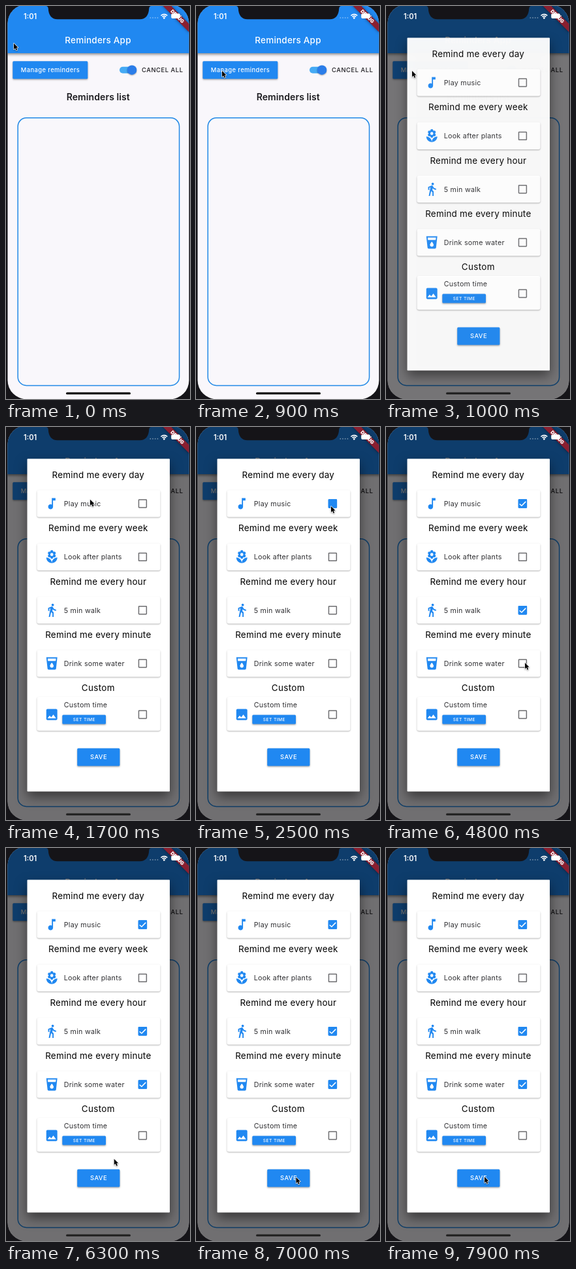
Write an HTML page with a canvas that moves like this. It is 282 by 600 pixels and loops after 8000 ms.

```html
<!DOCTYPE html>
<html lang="en">
<head>
<meta charset="utf-8">
<title>Reminders</title>
<style>
html, body { margin: 0; width: 100%; height: 100%; overflow: hidden; background: #151418; }
canvas { display: block; width: 282px; height: 600px; }
</style>
</head>
<body>
<canvas id="stage"></canvas>
<script>
const W = 282, H = 600, LOOP = 8000, STEP = 100;
const BLUE = '#2088f1', BEZEL = '#151418', INK = '#1d1c20';
const canvas = document.getElementById('stage');
const ctx = canvas.getContext('2d');
const dpr = window.devicePixelRatio || 1;
canvas.width = W * dpr;
canvas.height = H * dpr;

const clamp = v => Math.max(0, Math.min(1, v));
const smooth = v => v * v * (3 - 2 * v);

const icons = {
  note: 'M12 3v10.55c-.59-.34-1.27-.55-2-.55-2.21 0-4 1.79-4 4s1.79 4 4 4 4-1.79 4-4V7h4V3h-6z',
  leaves: 'M12 22c4.97 0 9-4.03 9-9-4.97 0-9 4.03-9 9zM3 13c0 4.97 4.03 9 9 9 0-4.97-4.03-9-9-9z',
  walk: 'M13.5 5.5c1.1 0 2-.9 2-2s-.9-2-2-2-2 .9-2 2 .9 2 2 2zM9.8 8.9L7 23h2.1l1.8-8 2.1 2v6h2v-7.5l-2.1-2 .6-3C14.8 12 16.8 13 19 13v-2c-1.9 0-3.5-1-4.3-2.4l-1-1.6c-.4-.6-1-1-1.7-1-.3 0-.5.1-.8.1L6 8.3V13h2V9.6l1.8-.7z',
  drink: 'M3 2l2.01 18.23C5.13 21.23 5.97 22 7 22h10c1.03 0 1.87-.77 1.99-1.77L21 2H3zm9 17c-1.66 0-3-1.34-3-3 0-2 3-5.4 3-5.4s3 3.4 3 5.4c0 1.66-1.34 3-3 3zm6.33-11H5.67l-.44-4h13.55l-.45 4z',
  image: 'M21 19V5c0-1.1-.9-2-2-2H5c-1.1 0-2 .9-2 2v14c0 1.1.9 2 2 2h14c1.1 0 2-.9 2-2zM8.5 13.5l2.5 3.01L14.5 12l4.5 6H5l3.5-4.5z'
};
for (const k in icons) icons[k] = new Path2D(icons[k]);

// y is the middle of the card, on is the time its box gets ticked
const rows = [
  { head: 'Remind me every day', label: 'Play music', icon: 'note', y: 117, on: 2400 },
  { head: 'Remind me every week', label: 'Look after plants', icon: 'leaves', y: 198.4 },
  { head: 'Remind me every hour', label: '5 min walk', icon: 'walk', y: 279.7, on: 4100 },
  { head: 'Remind me every minute', label: 'Drink some water', icon: 'drink', y: 361, on: 5100 }
];

// time, x, y of the pointer tip where it rests
const track = [
  [0, 12, 57], [700, 40, 99], [1100, 40, 99],
  [2250, 207, 121], [2800, 207, 121],
  [3900, 211, 279], [4250, 211, 279],
  [4750, 213, 360], [5400, 213, 360],
  [6660, 154, 503], [7900, 151, 502], [8000, 151, 502]
];

function pointerAt(t) {
  let i = 0;
  while (i < track.length - 2 && track[i + 1][0] <= t) i++;
  const [t0, x0, y0] = track[i], [t1, x1, y1] = track[i + 1];
  const k = smooth(clamp((t - t0) / (t1 - t0)));
  return [x0 + (x1 - x0) * k, y0 + (y1 - y0) * k];
}

function text(s, x, y, size, weight, color, spacing = 0, align = 'left') {
  ctx.font = `${weight} ${size}px Inter, Roboto, sans-serif`;
  ctx.letterSpacing = spacing + 'px';
  ctx.textAlign = align;
  ctx.fillStyle = color;
  ctx.fillText(s, x, y);
}

function box(x, y, w, h, r, fill) {
  ctx.beginPath();
  ctx.roundRect(x, y, w, h, r);
  ctx.fillStyle = fill;
  ctx.fill();
}

function disc(x, y, r) {
  ctx.beginPath();
  ctx.arc(x, y, r, 0, 7);
  ctx.fill();
}

function raised(blur, dy, alpha, draw) {
  ctx.save();
  ctx.shadowColor = `rgba(0,0,0,${alpha})`;
  ctx.shadowBlur = blur * dpr;
  ctx.shadowOffsetY = dy * dpr;
  draw();
  ctx.restore();
}

function button(x, y, w, h, label, size, spacing) {
  raised(2.5, 1.3, .36, () => box(x, y, w, h, 1.5, BLUE));
  text(label, x + w / 2 + spacing / 2, y + h / 2 + size * .36, size, 500, '#fff', spacing, 'center');
}

function icon(name, x, y) {
  ctx.save();
  ctx.translate(x, y);
  ctx.scale(.94, .94);
  ctx.translate(-12, -12);
  ctx.fillStyle = BLUE;
  ctx.fill(icons[name], 'evenodd');
  if (name === 'leaves') {
    for (const [px, py] of [[12, 3.5], [8.1, 5.75], [15.9, 5.75], [8.1, 10.25], [15.9, 10.25], [12, 12.5]]) disc(px, py, 2.5);
    disc(12, 8, 4);
    ctx.fillStyle = '#fff';
    disc(12, 8, 2.5);
  }
  ctx.restore();
}

function checkbox(y, k) {
  const s = 13.4, x = 209.4 - s / 2, top = y - s / 2;
  ctx.strokeStyle = k > 0 ? BLUE : '#6d6d70';
  ctx.lineWidth = 1.5;
  ctx.beginPath();
  ctx.roundRect(x + .75, top + .75, s - 1.5, s - 1.5, .6);
  ctx.stroke();
  if (k <= 0) return;
  const inset = s / 2 * (1 - clamp(k * 2));
  box(x + inset, top + inset, s - inset * 2, s - inset * 2, .8, BLUE);
  const p = clamp(k * 2 - 1);
  if (p <= 0) return;
  const a = clamp(p * 2), b = clamp(p * 2 - 1);
  ctx.strokeStyle = '#fff';
  ctx.beginPath();
  ctx.moveTo(x + 2, top + 7.2);
  ctx.lineTo(x + 2 + 3.2 * a, top + 7.2 + 2.8 * a);
  if (b > 0) ctx.lineTo(x + 5.2 + 6.3 * b, top + 10 - 6.4 * b);
  ctx.stroke();
}

function page() {
  ctx.fillStyle = '#f9f7fb';
  ctx.fillRect(0, -3, W, H + 6);
  raised(4, 1.5, .45, () => box(-4, -10, W + 8, 82, 0, BLUE));
  text('Reminders App', 141, 57, 13.5, 500, '#fff', .22, 'center');

  button(10.3, 84.3, 115, 27, 'Manage reminders', 9.4, .4);
  box(174, 92.7, 26, 10, 5, '#45aaf4');
  ctx.fillStyle = '#2b7de9';
  raised(2, 1, .35, () => disc(193, 97.7, 7.3));
  text('CANCEL ALL', 208, 101.2, 9.4, 500, INK, .55);

  text('Reminders list', 141.3, 144, 14, 600, INK, .1, 'center');
  ctx.beginPath();
  ctx.roundRect(18.2, 170.8, 247.4, 408.6, 13);
  ctx.strokeStyle = '#2189e6';
  ctx.lineWidth = 1.5;
  ctx.stroke();
}

function card(y, h) {
  raised(2, 1, .3, () => box(47.5, y, 189, h, 3, '#fff'));
}

function dialog(t, alpha) {
  ctx.save();
  ctx.fillStyle = `rgba(0,0,0,${.55 * alpha})`;
  ctx.fillRect(0, -3, W, H + 6);
  ctx.globalAlpha = alpha;
  raised(18, 8, .5, () => box(32.5, 48.6, 218.5, 508, 1, '#fff'));
  for (const r of rows) {
    text(r.head, 141.3, r.y - 39.2, 13.4, 400, '#000', .27, 'center');
    card(r.y - 20.8, 41.4);
    icon(r.icon, 70.2, r.y);
    text(r.label, 88.7, r.y + 4, 10.7, 400, '#2d2d30', .27);
    checkbox(r.y, r.on ? clamp((t - r.on) / 200) : 0);
  }
  text('Custom', 141.3, 403, 13.4, 400, '#000', .4, 'center');
  card(412, 51.8);
  icon('image', 70.2, 439);
  text('Custom time', 88.7, 428.4, 10.7, 400, '#2d2d30', .27);
  button(86.3, 439.4, 66.7, 14, 'SET TIME', 6.7, .45);
  checkbox(439, 0);
  button(109.2, 490.6, 65.2, 26.8, 'SAVE', 9.4, .4);
  ctx.restore();
}

function ribbon() {
  ctx.save();
  ctx.translate(280.5, -2.2);
  ctx.rotate(Math.PI / 4);
  raised(4, 0, .5, () => box(-30, 20.8, 60, 8.9, 0, '#8a1f30'));
  text('DEBUG', 0, 27.9, 7.4, 900, '#fff', 0, 'center');
  ctx.restore();
}

function statusBar() {
  text('1:01', 27, 19.5, 11.1, 600, '#fff');
  ctx.fillStyle = 'rgba(255,255,255,.4)';
  for (let i = 0; i < 4; i++) disc(221.3 + i * 3.7, 18, .9);
  ctx.strokeStyle = '#fff';
  ctx.lineWidth = 1.6;
  for (const r of [3.9, 6.7]) {
    ctx.beginPath();
    ctx.arc(242.3, 19.3, r, -Math.PI * .76, -Math.PI * .24);
    ctx.stroke();
  }
  ctx.fillStyle = '#fff';
  disc(242.3, 18.4, 1.4);
  box(253.2, 11.6, 13.6, 7.4, 2, '#fff');
  box(267.4, 14, 1.2, 2.8, .6, '#fff');
}

function notch() {
  ctx.beginPath();
  ctx.moveTo(61, 0);
  ctx.quadraticCurveTo(64.5, 0, 64.8, 4);
  ctx.bezierCurveTo(65.2, 14, 70, 20.3, 79, 20.3);
  ctx.lineTo(205, 20.3);
  ctx.bezierCurveTo(214, 20.3, 218.8, 14, 219.2, 4);
  ctx.quadraticCurveTo(219.5, 0, 223, 0);
  ctx.fillStyle = BEZEL;
  ctx.fill();
}

function pointer(x, y) {
  ctx.save();
  ctx.translate(x, y);
  ctx.scale(.88, .88);
  ctx.beginPath();
  for (const [px, py] of [[0, 0], [0, 10.4], [2.4, 8.3], [4.1, 12.2], [5.9, 11.4], [4.3, 7.6], [7.4, 7.4]]) ctx.lineTo(px, py);
  ctx.closePath();
  ctx.lineJoin = 'round';
  ctx.lineWidth = 1.5;
  ctx.strokeStyle = '#fff';
  raised(2, 1, .35, () => ctx.stroke());
  ctx.fillStyle = '#000';
  ctx.fill();
  ctx.restore();
}

function draw(t) {
  ctx.setTransform(dpr, 0, 0, dpr, 0, 0);
  ctx.fillStyle = BEZEL;
  ctx.fillRect(0, 0, W, H);
  ctx.save();
  ctx.beginPath();
  ctx.roundRect(2.5, -2.2, 278, 602.5, 29);
  ctx.clip();
  page();
  const k = clamp((t - 900) / 125);
  const alpha = 1 - (1 - k) ** 2;
  if (alpha > 0) dialog(t, alpha);
  const shade = 8 + 28 * alpha;
  box(92, 589.7, 99, 3.4, 1.7, `rgb(${shade},${shade},${shade})`);
  ribbon();
  ctx.restore();
  notch();
  statusBar();
  pointer(...pointerAt(t));
}

const start = performance.now();
function tick() {
  const t = (performance.now() - start) % LOOP;
  draw(Math.floor(t / STEP) * STEP);
  requestAnimationFrame(tick);
}
tick();
</script>
</body>
</html>
```
